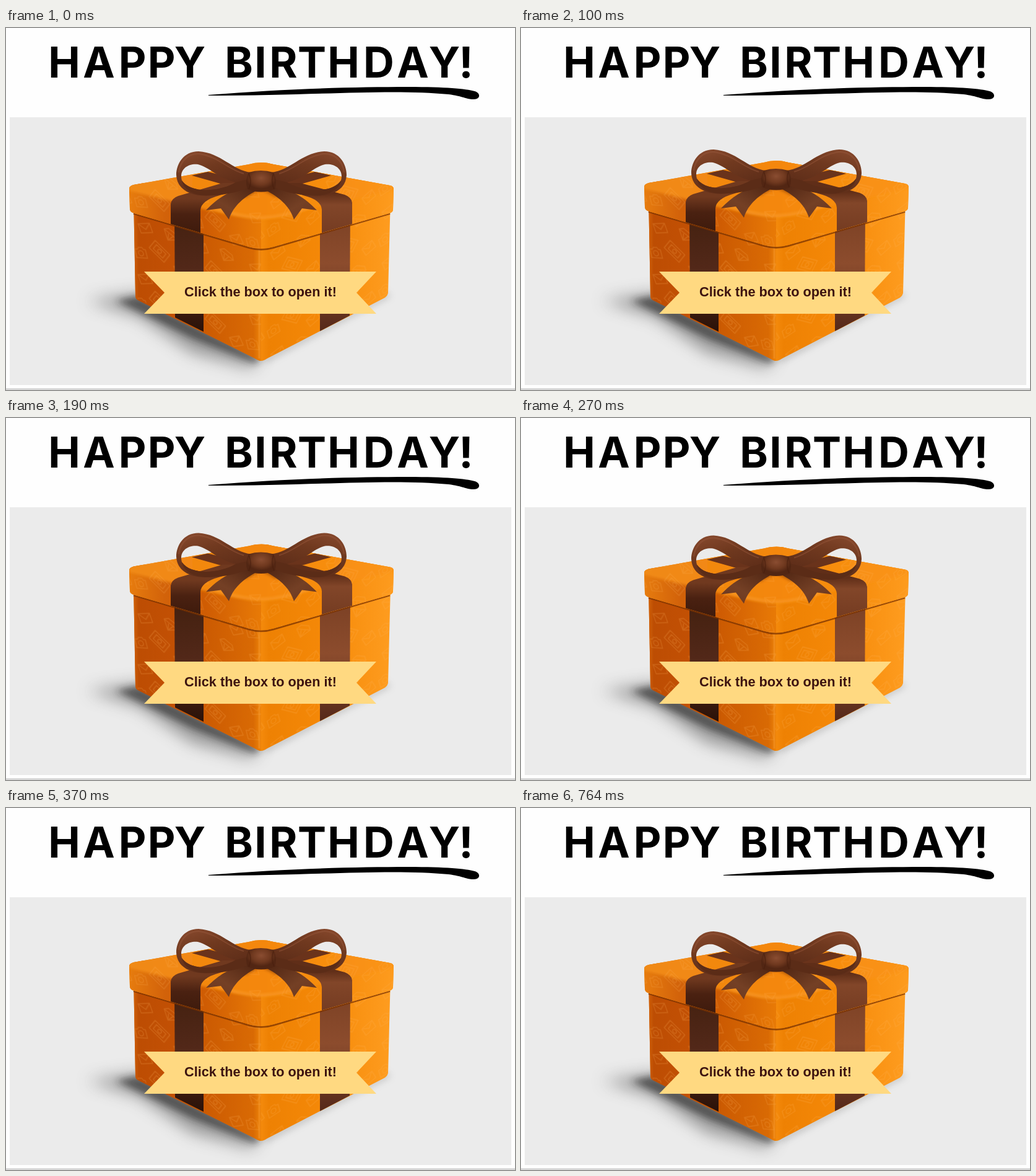
Animation, 822 px wide and 584 px high, one loop 980 ms. Source, as an HTML page:

```html
<!DOCTYPE html>
<html lang="en">
<head>
<meta charset="utf-8">
<title>Birthday box</title>
<style>
  html, body { margin: 0; width: 100%; height: 100%; overflow: hidden; background: #fefefe; }
  svg { display: block; width: 100vw; height: 100vh; }
  .title { font: 700 69px Inter, "Open Sans", sans-serif; text-anchor: middle; }
  .label { font: 700 21.7px "Liberation Sans", Arial, sans-serif; text-anchor: middle; fill: #3d1410; }
</style>
</head>
<body>
<svg viewBox="0 0 822 584">
  <defs>
    <linearGradient id="leftFace">
      <stop offset="0" stop-color="#d06108"/><stop offset=".04" stop-color="#bd4d03"/>
      <stop offset=".3" stop-color="#c25004"/><stop offset=".55" stop-color="#cb5a02"/>
      <stop offset=".94" stop-color="#d96a04"/><stop offset="1" stop-color="#ee8408"/>
    </linearGradient>
    <linearGradient id="rightFace">
      <stop offset="0" stop-color="#f48a0c"/><stop offset=".06" stop-color="#ee8103"/>
      <stop offset=".5" stop-color="#f58908"/><stop offset="1" stop-color="#fe9c1f"/>
    </linearGradient>
    <linearGradient id="lidLeft">
      <stop offset="0" stop-color="#ea800f"/><stop offset=".3" stop-color="#d2620a"/>
      <stop offset=".6" stop-color="#cf5c03"/><stop offset="1" stop-color="#e87a06"/>
    </linearGradient>
    <linearGradient id="lidTop">
      <stop offset="0" stop-color="#f08a1a"/><stop offset=".5" stop-color="#f48709"/>
      <stop offset="1" stop-color="#fb9519"/>
    </linearGradient>
    <linearGradient id="darkRibbon" x2="0" y2="1">
      <stop offset="0" stop-color="#42200f"/><stop offset=".55" stop-color="#54291a"/>
      <stop offset="1" stop-color="#2a1108"/>
    </linearGradient>
    <linearGradient id="lightRibbon" x2="0" y2="1">
      <stop offset="0" stop-color="#7a4024"/><stop offset=".45" stop-color="#8c4c2d"/>
      <stop offset="1" stop-color="#54281a"/>
    </linearGradient>
    <linearGradient id="lidRibbonLeft" x2="0" y2="1">
      <stop offset=".3" stop-color="#70391f"/><stop offset=".6" stop-color="#4a2111"/>
      <stop offset="1" stop-color="#3d1a0c"/>
    </linearGradient>
    <linearGradient id="lidRibbonRight" x2="0" y2="1">
      <stop offset=".2" stop-color="#602e18"/><stop offset=".42" stop-color="#824629"/>
      <stop offset="1" stop-color="#743b21"/>
    </linearGradient>
    <linearGradient id="loop" x2=".5" y2="1">
      <stop offset="0" stop-color="#8a4b2f"/><stop offset=".45" stop-color="#70391f"/>
      <stop offset="1" stop-color="#5c2c18"/>
    </linearGradient>
    <linearGradient id="tail" x1="1" x2="0" y2="1">
      <stop offset="0" stop-color="#4e2412"/><stop offset=".6" stop-color="#744025"/>
      <stop offset="1" stop-color="#6b361f"/>
    </linearGradient>
    <radialGradient id="knot" cy=".35">
      <stop offset="0" stop-color="#8a4d31"/><stop offset=".6" stop-color="#70391f"/>
      <stop offset="1" stop-color="#522613"/>
    </radialGradient>
    <filter id="soft" x="-40%" y="-40%" width="180%" height="180%"><feGaussianBlur stdDeviation="2"/></filter>
    <filter id="haze" x="-40%" y="-60%" width="180%" height="220%"><feGaussianBlur stdDeviation="13"/></filter>
    <filter id="shade" x="-40%" y="-60%" width="180%" height="220%"><feGaussianBlur stdDeviation="6"/></filter>
    <g id="icons" fill="none" stroke="#ffb45c" stroke-width="1.6" stroke-linejoin="round">
      <path transform="translate(19 18) rotate(-22)" d="M-10-7H10V7H-10ZL0 2L10-7"/>
      <path transform="translate(60 14) rotate(24)" d="M-7-7H7L12-1L0 11L-12-1ZM-12-1H12M-4-1L0 11L4-1"/>
      <path transform="translate(42 47) rotate(32)" d="M-14-9H14V9H-14ZM-9-5H9V5H-9ZM-3 0A3 3 0 1 0 3 0A3 3 0 1 0-3 0"/>
      <path transform="translate(12 61) rotate(-16)" d="M-9-6H-4L-2-9H4L6-6H9V7H-9ZM-4 0A4 4 0 1 0 4 0A4 4 0 1 0-4 0"/>
      <path transform="translate(76 65) rotate(-28)" d="M-9-7H9V7H-9ZL0 1L9-7"/>
    </g>
    <pattern id="printLeft" width="90" height="82" patternUnits="userSpaceOnUse" patternTransform="translate(206 298) skewY(20)"><use href="#icons"/></pattern>
    <pattern id="printRight" width="90" height="82" patternUnits="userSpaceOnUse" patternTransform="translate(420 350) skewY(-20)"><use href="#icons"/></pattern>
    <path id="lidShape" d="M199 259Q199 255 206 253L392 220Q412 214 432 220L620 254Q626 255 626 260L625 293Q625 297 619 299L432 353Q412 359 392 353L207 299Q200 297 200 292Z"/>
    <clipPath id="lidClip"><use href="#lidShape"/></clipPath>
    <g id="bowHalf">
      <path fill="url(#loop)" fill-rule="evenodd" d="M396 233C366 230 347 201 311 199C286 199 275 220 275 237C276 261 299 273 332 270C357 267 378 264 396 255Z
        M284 246C279 228 294 218 310 220C328 224 343 243 371 249C346 264 299 268 284 246Z"/>
      <path fill="#5b2c17" d="M284 246C299 268 346 264 371 249L392 244L394 256C370 268 339 271 320 270C298 268 286 258 284 246Z"/>
      <path fill="none" stroke="#95573a" stroke-width="2" opacity=".5" d="M279 233C282 212 297 202 312 203C342 207 358 228 384 235"/>
    </g>
    <path id="bowTail" fill="url(#tail)" d="M392 255C362 262 343 273 323 294L347 291L360 309C367 286 386 272 405 262Z"/>
  </defs>

  <rect width="822" height="584" fill="#fefefe"/>
  <text class="title" y="80" x="94 150 204 251 297">HAPPY</text>
  <text class="title" y="80" x="376 411 448 494 545 602 657 708 743">BIRTHDAY!</text>
  <path d="M327 108C450 98 560 95 650 95C710 95 742 98 757 102C767 105 766 115 756 115C746 116 738 110 715 107C620 98 500 109 327 109Z"/>
  <rect x="6" y="144" width="810" height="432" fill="#ebebeb"/>
  <rect y="581.5" width="822" height="2" fill="#c9c9c9"/>

  <path d="M130 440L215 428L412 530L396 549L300 524L215 466Z" fill="#555" opacity=".55" filter="url(#haze)"/>
  <path d="M178 440L215 432L412 533L402 541L300 500Z" fill="#222" opacity=".6" filter="url(#shade)"/>
  <path d="M412 531L616 426L621 433L420 540Z" fill="#777" opacity=".35" filter="url(#shade)"/>

  <path id="bodyLeft" d="M206 272L412 330V537Q408 537 402 533L213 439Q209 437 209 432Z" fill="url(#leftFace)"/>
  <path id="bodyRight" d="M412 330L621 272L617 428Q616 432 612 435L422 533Q416 537 412 537Z" fill="url(#rightFace)"/>
  <use href="#bodyLeft"/>
  <path d="M206 272L412 330V537L209 435Z" fill="url(#printLeft)" opacity=".2"/>
  <path d="M412 330L621 272L617 432L412 537Z" fill="url(#printRight)" opacity=".2"/>
  <path d="M409 340V533" stroke="#f9a03c" stroke-width="3" opacity=".35"/>
  <path d="M272 290L319 303V490L273 467Z" fill="url(#darkRibbon)"/>
  <path d="M507 303L556 290L555 464L507 489Z" fill="url(#lightRibbon)"/>

  <g id="lid">
    <path d="M206 299L392 354Q412 360 432 354L620 299" fill="none" stroke="#7a3200" stroke-width="3.5" opacity=".75"/>
    <use href="#lidShape" fill="url(#rightFace)"/>
    <g clip-path="url(#lidClip)">
      <path d="M412 200H630V360H412Z" fill="url(#rightFace)"/>
      <path d="M190 250H412V360H190Z" fill="url(#lidLeft)"/>
      <path d="M190 250L412 205L635 250V259Q560 276 510 288Q440 308 412 308Q384 308 314 291Q240 273 190 260Z" fill="url(#lidTop)" filter="url(#soft)"/>
      <path d="M190 240H412V360H190Z" fill="url(#printLeft)" opacity=".18"/>
      <path d="M412 210H630V360H412Z" fill="url(#printRight)" opacity=".18"/>
      <path d="M330 288Q378 306 412 306Q446 306 494 288" fill="none" stroke="#ffaa40" stroke-width="4" opacity=".5" filter="url(#soft)"/>
      <path d="M300 238L326 232L400 250L385 262ZM525 238L499 232L425 250L440 262Z" fill="#6a331b"/>
      <path d="M266 320V284Q267 275 278 271L350 250L408 250L345 270Q315 278 314 294V334Z" fill="url(#lidRibbonLeft)"/>
      <path d="M559 320V282Q558 273 547 269L475 250L417 250L480 270Q509 277 510 293V334Z" fill="url(#lidRibbonRight)"/>
    </g>
    <path d="M352 270Q412 242 472 270L436 273L412 261L388 273Z" fill="#712c00" opacity=".45" filter="url(#soft)"/>
    <use href="#bowTail"/>
    <use href="#bowTail" transform="matrix(-1 0 0 1 825 0)"/>
    <use href="#bowHalf"/>
    <use href="#bowHalf" transform="matrix(-1 0 0 1 825 0)"/>
    <path d="M392 233Q411 227 432 233Q439 247 434 260Q412 269 390 260Q385 247 392 233Z" fill="url(#knot)"/>
    <path d="M392 235Q398 247 392 260M432 235Q427 247 433 260" fill="none" stroke="#481f0e" stroke-width="1.5" opacity=".6"/>
  </g>

  <path d="M223 393H598L566 427L598 461H223L256 427Z" fill="#ffd981"/>
  <text class="label" x="411" y="433">Click the box to open it!</text>
</svg>
<script>
  const LOOP = 980;
  // [start in ms, lid offset in px]: the lid hops in hard steps
  const hops = [[0, 0], [100, -3], [130, -7], [190, -13.5], [270, -9.5], [370, -4], [440, 0]];
  const lid = document.getElementById("lid");
  const start = performance.now();

  function render(time) {
    const lift = hops.findLast(([from]) => time >= from)[1];
    lid.setAttribute("transform", `translate(0 ${lift})`);
  }

  function tick() {
    render((performance.now() - start) % LOOP);
    requestAnimationFrame(tick);
  }
  tick();
</script>
</body>
</html>
```
